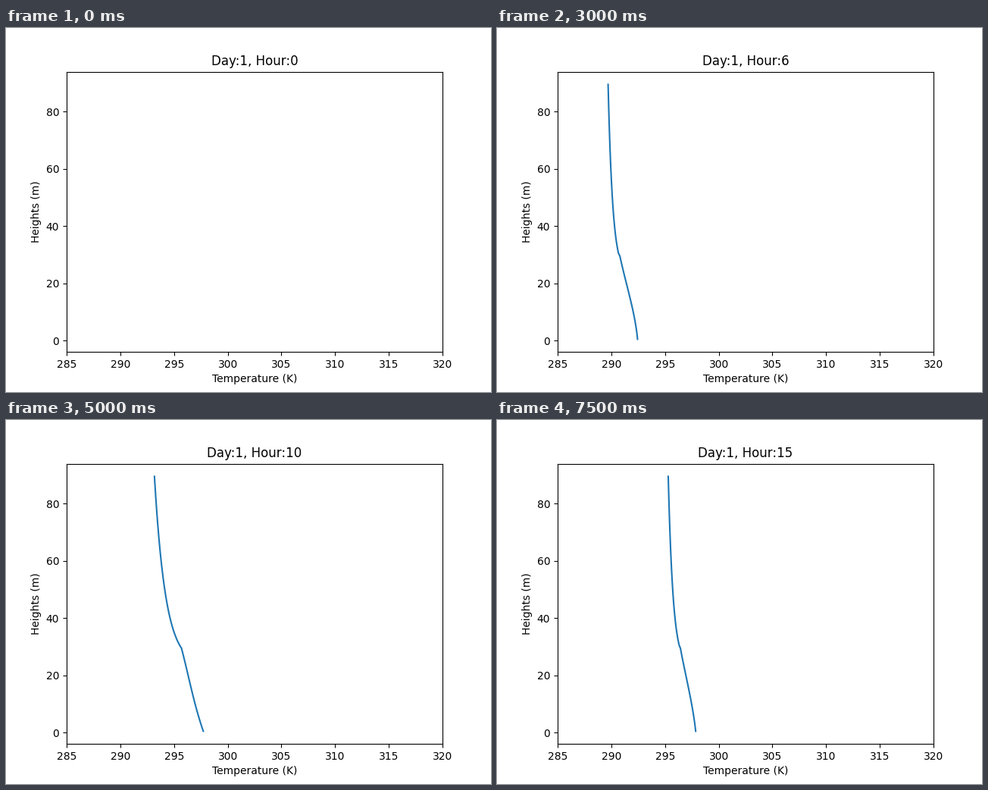
Animation, 640 px wide and 480 px high, one loop 8 s. Source, as a matplotlib script:

```python
import numpy as np
import matplotlib.pyplot as plt
from matplotlib.animation import FuncAnimation

HOURS = 16
CANOPY = 30  # canopy top in metres
z = np.arange(90) + 0.5
z_in, z_out = z[z < CANOPY], z[z > CANOPY]


def track(hours, values):
    """Smooth curve through a few (hour, value) points, held at its ends."""
    x, y = np.array(hours, float), np.array(values, float)
    slope = np.gradient(y, x)

    def at(hour):
        hour = np.clip(hour, x[0], x[-1])
        i = min(np.searchsorted(x, hour, side="right") - 1, len(x) - 2)
        h = x[i + 1] - x[i]
        t = (hour - x[i]) / h
        s = t * t * (3 - 2 * t)
        return ((1 - s) * y[i] + s * y[i + 1]
                + h * t * (1 - t) * ((1 - t) * slope[i] - t * slope[i + 1]))

    return at


# Temperature at the top level, then the warming towards the ground in kelvin
top = track([1, 2, 4, 6, 7, 9, 11, 13, 15],
            [291.3, 290.7, 289.2, 289.7, 290.85, 292.4, 293.9, 295.0, 295.3])
key_hours = [2, 4, 7, 9, 11, 15]
above = track(key_hours, [0.94, 1.11, 1.06, 1.93, 2.63, 1.02])
inside = track(key_hours, [2.60, 2.88, 1.15, 1.36, 2.68, 1.42])
bow = track(key_hours, [2.0, 2.0, 0.5, 0.6, -1.9, 0.6])

# Logarithmic layer over the canopy: 1 at its lowest level, 0 at the top
log_z = np.log(z_out - 23.5)
layer = (log_z[-1] - log_z) / (log_z[-1] - log_z[0])
# Depth below the canopy top: 0 to 1
depth = (z_in[-1] - z_in) / (z_in[-1] - z_in[0])


def profile(hour):
    low = (above(hour) + inside(hour) * (0.08 + depth)
           + bow(hour) * depth**2 * (1 - depth))
    return top(hour) + np.concatenate([low, above(hour) * layer])


fig, ax = plt.subplots(figsize=(6.4, 4.8), dpi=100)
line, = ax.plot([], [])
ax.set_xlim(285, 320)
ax.set_ylim(-3.95, 93.95)
ax.set_xlabel("Temperature (K)")
ax.set_ylabel("Heights (m)")
title = ax.set_title("Day:1, Hour:0")


def update(hour):
    if hour == 0:
        line.set_data([], [])
    else:
        line.set_data(profile(hour), z)
    title.set_text(f"Day:1, Hour:{hour}")
    return line, title


anim = FuncAnimation(fig, update, frames=HOURS, interval=500,
                     repeat=True, repeat_delay=0, blit=False)
plt.show()
```
